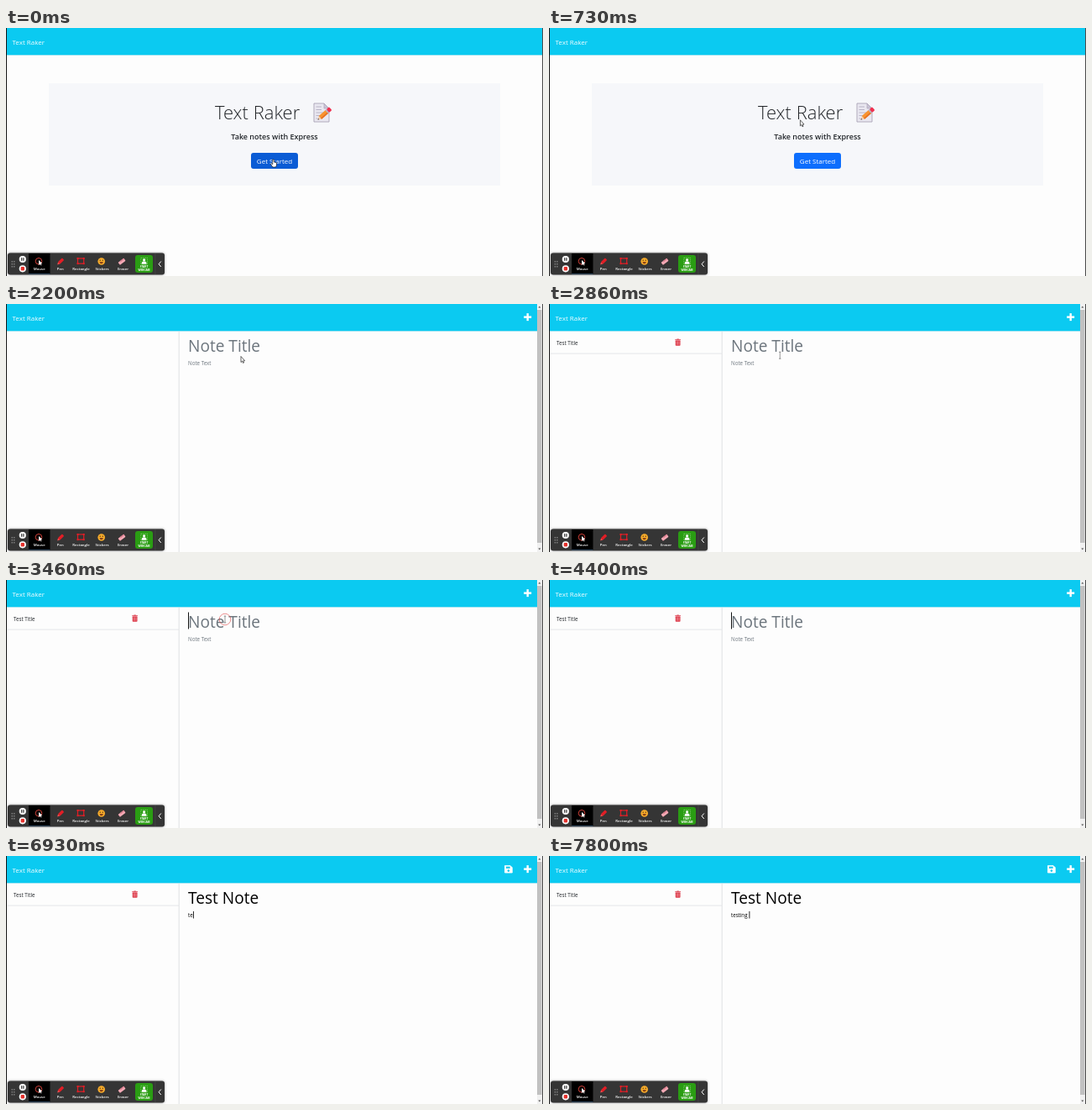
An HTML page with a canvas for the animation above (8 s loop, 640 px wide and 296 px high).

```html
<!DOCTYPE html>
<html lang="en">
<head>
<meta charset="utf-8">
<title>Text Raker</title>
<style>
html, body { margin: 0; width: 100%; height: 100%; overflow: hidden; background: #fdfdfd; }
canvas { display: block; width: 640px; height: 296px; }
</style>
</head>
<body>
<canvas id="stage"></canvas>
<script>
const LOOP = 8000, W = 640, H = 296;
const SANS = '"Open Sans", "Noto Sans", sans-serif';
const APP = 'Text Raker';
const canvas = document.getElementById('stage');
const ctx = canvas.getContext('2d');
const ratio = window.devicePixelRatio || 1;
canvas.width = W * ratio;
canvas.height = H * ratio;

// Moments when each field gains a letter
const TITLE = { text: 'Test Note', keys: [4530, 4730, 4800, 5060, 5260, 5330, 5460, 5530, 5730] };
const BODY = { text: 'testing ', keys: [6800, 6930, 7200, 7260, 7400, 7530, 7660, 7800] };

const clamp = v => Math.max(0, Math.min(1, v));
const ease = v => v * v * (3 - 2 * v);
const span = (t, a, b) => ease(clamp((t - a) / (b - a)));
const lerp = (a, b, k) => a + (b - a) * k;
const typed = (field, t) => field.text.slice(0, field.keys.filter(k => k <= t).length);

function rect(x, y, w, h, color) {
  ctx.fillStyle = color;
  ctx.fillRect(x, y, w, h);
}

function box(x, y, w, h, r, color) {
  ctx.beginPath();
  ctx.roundRect(x, y, w, h, r);
  ctx.fillStyle = color;
  ctx.fill();
}

function disc(x, y, r, color) {
  ctx.beginPath();
  ctx.arc(x, y, r, 0, 7);
  ctx.fillStyle = color;
  ctx.fill();
}

function ring(x, y, r, color, width) {
  ctx.beginPath();
  ctx.arc(x, y, r, 0, 7);
  ctx.strokeStyle = color;
  ctx.lineWidth = width;
  ctx.stroke();
}

function trace(points) {
  ctx.beginPath();
  points.forEach(([x, y]) => ctx.lineTo(x, y));
}

function poly(points, fill, stroke, width = 0.7) {
  trace(points);
  ctx.closePath();
  if (fill) { ctx.fillStyle = fill; ctx.fill(); }
  if (stroke) { ctx.strokeStyle = stroke; ctx.lineWidth = width; ctx.stroke(); }
}

function line(points, color, width) {
  trace(points);
  ctx.strokeStyle = color;
  ctx.lineWidth = width;
  ctx.stroke();
}

function text(str, x, y, size, color, weight = 400, align = 'left') {
  ctx.font = `${weight} ${size}px ${SANS}`;
  ctx.textAlign = align;
  ctx.fillStyle = color;
  ctx.fillText(str, x, y);
  return ctx.measureText(str).width;
}

function at(x, y, angle, draw) {
  ctx.save();
  ctx.translate(x, y);
  ctx.rotate(angle);
  draw();
  ctx.restore();
}

function memoIcon() {
  poly([[367, 90], [379, 90], [385, 96], [385, 112], [367, 112]], '#e9e7f0', '#aaa3b6', 0.9);
  poly([[379, 90], [385, 96], [379, 96]], '#c9c2d5', '#aaa3b6', 0.6);
  [[94, 376], [97.5, 376], [101, 380], [104.5, 374], [108, 371]].forEach(([y, end]) =>
    line([[369.5, y], [end, y]], '#aca6bb', 0.8));
  at(371.5, 109.5, -0.72, () => {
    poly([[0, 0], [4, -2.6], [4, 2.6]], '#f3cfae');
    poly([[0, 0], [1.6, -1], [1.6, 1]], '#473a45');
    rect(4, -2.6, 11, 5.2, '#f8932f');
    rect(4, 0.9, 11, 1.7, '#e77224');
    rect(14.2, -2.6, 2, 5.2, '#b9b5c4');
    box(16, -2.6, 4.3, 5.2, 1.3, '#f0304f');
  });
}

function navbar(right) {
  rect(1, 0, right - 1, 32, '#0bcaf1');
  rect(1, 32, right - 1, 1, '#a9e5f2');
  text(APP, 7.5, 19.5, 8, '#f4fdff');
}

function home(t) {
  navbar(639);
  rect(51, 66, 538, 122, '#f6f7fa');
  text(APP, 249, 109, 22, '#24272b', 300);
  memoIcon();
  text('Take notes with Express', 320, 133, 9, '#212529', 600, 'center');
  const k = span(t, 400, 620);
  const rgb = [lerp(11, 13, k), lerp(92, 110, k), lerp(213, 253, k)].map(Math.round);
  box(292, 149, 56, 19, 3, `rgb(${rgb})`);
  text('Get Started', 320, 162, 8, '#fff', 400, 'center');
}

function scrollbar() {
  rect(633, 0, 6, H, '#f1f1f1');
  rect(633, 7, 5.5, 278, '#c1c1c1');
  poly([[634.3, 4.5], [637.3, 4.5], [635.8, 2.6]], '#555');
  poly([[634.3, 291.5], [637.3, 291.5], [635.8, 293.4]], '#555');
}

function saveIcon() {
  poly([[594.5, 11.5], [601, 11.5], [603.3, 13.8], [603.3, 20], [594.5, 20]], '#fff', '#fff', 0.8);
  rect(596, 12.6, 4.7, 2.2, '#0bcaf1');
  disc(598.9, 17.6, 1.3, '#0bcaf1');
}

function trashIcon() {
  box(150.7, 43.4, 5.8, 6.4, 0.8, '#dc3545');
  rect(150.2, 42.3, 6.8, 0.9, '#dc3545');
  rect(152.3, 41.6, 2.6, 0.9, '#dc3545');
  [152.1, 153.6, 155.1].forEach(x => line([[x, 44.5], [x, 48.7]], '#f6c4c9', 0.5));
}

function field(value, hint, y, size) {
  return value ? text(value, 217, y, size, '#000') : (text(hint, 217, y, size, '#6c757d'), 0);
}

function notes(t) {
  navbar(633);
  scrollbar();
  rect(617.2, 14.4, 9, 2.4, '#fff');
  rect(620.5, 11.1, 2.4, 9, '#fff');
  rect(205.7, 33, 0.9, 263, '#dcdee1');
  if (t >= 2400) {
    text('Test Title', 9, 48.5, 6.2, '#212529');
    trashIcon();
    rect(1, 58.7, 205, 0.8, '#dfe1e4');
  }
  if (t >= 6870) saveIcon();

  const titleEnd = 217 + field(typed(TITLE, t), 'Note Title', 56.6, 19.1);
  const bodyEnd = 217 + field(typed(BODY, t), 'Note Text', 72.7, 6.2);
  const blinkOff = (t >= 3860 && t < 4400) || (t >= 6200 && t < 6730);
  if (t >= 3400 && !blinkOff) {
    if (t < 6730) rect(titleEnd, 38.5, 1, 20, '#111');
    else rect(bodyEnd + 0.3, 66, 0.9, 8.5, '#111');
  }
}

function arrow(x, y) {
  poly([[x, y - 4], [x, y + 3], [x + 1.5, y + 1.7], [x + 2.6, y + 4], [x + 3.6, y + 3.5],
    [x + 2.6, y + 1.4], [x + 4.6, y + 1.2]], '#fff', '#222', 0.7);
}

function hand(x, y) {
  poly([[x - 1.2, y - 4.5], [x + 0.3, y - 4.5], [x + 0.5, y - 1.5], [x + 3.6, y - 0.6],
    [x + 3.4, y + 2.6], [x + 2.5, y + 4.5], [x - 1.2, y + 4.5], [x - 3.4, y + 1],
    [x - 2.6, y + 0.2], [x - 1.2, y + 1.2]], '#fff', '#222', 0.7);
}

function beam(x, y) {
  line([[x, y - 4], [x, y + 4]], '#555', 0.6);
  [-4, 4].forEach(d => line([[x - 1.2, y + d], [x + 1.2, y + d]], '#555', 0.6));
}

function pointer(t) {
  if (t < 1800) {
    const k = span(t, 330, 1130);
    const x = lerp(319, 280, k), y = lerp(161.5, 66.5, k);
    (y > 149 ? hand : arrow)(x, y);
  } else if (t < 2600) {
    arrow(280, 66.5);
  } else if (t < 4000) {
    const k = span(t, 2600, 3400);
    beam(lerp(280, 261, k), lerp(66, 47, k));
  }
  if (t >= 3400 && t < 3600) ring(261, 47, 6.8, 'rgba(222,70,70,.75)', 0.8);
}

function toolbar() {
  ctx.save();
  ctx.shadowColor = 'rgba(0,0,0,.4)';
  ctx.shadowBlur = 3;
  box(2, 268.5, 187, 26, 3, '#353535');
  ctx.restore();
  for (let i = 0; i < 6; i++) disc(7.2 + i % 2 * 2.6, 278.8 + (i >> 1) * 3, 0.65, '#ccc');

  disc(19.8, 276, 4.1, '#fff');
  rect(18.1, 274.2, 1.2, 3.6, '#333');
  rect(20.3, 274.2, 1.2, 3.6, '#333');
  disc(19.8, 287.3, 4.1, '#fff');
  box(17.6, 285.1, 4.4, 4.4, 1, '#e5322d');

  rect(27, 269, 25.5, 25, '#000');
  rect(27, 293, 25.5, 0.8, '#3e5d78');
  ring(39, 278.3, 3.8, '#e8483f', 0.9);
  poly([[39, 277], [39, 283.2], [40.5, 281.8], [41.8, 283.6], [42.5, 283], [41.5, 281.2], [43.2, 281]], '#fff');

  at(61.2, 282.4, -0.78, () => {
    poly([[0, 0], [2.8, -1.6], [2.8, 1.6]], '#f05050');
    box(2.6, -1.7, 7, 3.4, 0.8, '#e21e26');
  });

  ctx.strokeStyle = '#e21e26';
  ctx.lineWidth = 1.2;
  ctx.strokeRect(85.5, 275, 7.2, 6.2);
  [[85.5, 275], [92.7, 275], [85.5, 281.2], [92.7, 281.2]].forEach(([x, y]) => rect(x - 1, y - 1, 2, 2, '#e21e26'));

  disc(113.7, 278.5, 4.3, '#f9ad2b');
  disc(112.2, 277.3, 0.7, '#4b3210');
  disc(115.2, 277.3, 0.7, '#4b3210');
  ctx.beginPath();
  ctx.arc(113.7, 279, 2.2, 0.1, 3.04);
  ctx.fillStyle = '#7a3514';
  ctx.fill();

  at(135, 281, -0.65, () => {
    box(-0.5, -1.8, 8.5, 3.8, 0.7, '#f4a9b5');
    rect(2.5, -1.8, 5.5, 1.4, '#d97d8e');
  });

  ['Mouse', 'Pen', 'Rectangle', 'Stickers', 'Eraser'].forEach((name, i) =>
    text(name, [39.7, 64.7, 89.5, 114.5, 139.5][i], 289, 4.3, '#fff', 600, 'center'));

  box(154, 271, 21, 21, 3, '#2a9d13');
  ctx.save();
  ctx.setLineDash([1.4, 0.9]);
  ctx.strokeStyle = '#a9e39d';
  ctx.lineWidth = 0.6;
  ctx.strokeRect(160.8, 274.3, 7.6, 7.6);
  ctx.restore();
  disc(164.6, 276.8, 1.6, '#fff');
  box(161.8, 278.6, 5.6, 3.2, [2, 2, 0, 0], '#fff');
  text('START', 164.5, 286.4, 3.2, '#fff', 700, 'center');
  text('WEBCAM', 164.5, 289.9, 3.2, '#fff', 700, 'center');

  rect(177.6, 269, 0.6, 25, '#4a4a4a');
  line([[184.8, 278.5], [182, 281.8], [184.8, 285]], '#fff', 1);
}

function frame(now) {
  const t = now % LOOP;
  ctx.setTransform(ratio, 0, 0, ratio, 0, 0);
  rect(0, 0, W, H, '#fdfdfd');
  (t < 1800 ? home : notes)(t);
  rect(0, 0, 1, H, '#161616');
  rect(639, 0, 1, H, '#4a4a4a');
  toolbar();
  pointer(t);
  requestAnimationFrame(frame);
}
requestAnimationFrame(frame);
</script>
</body>
</html>
```
